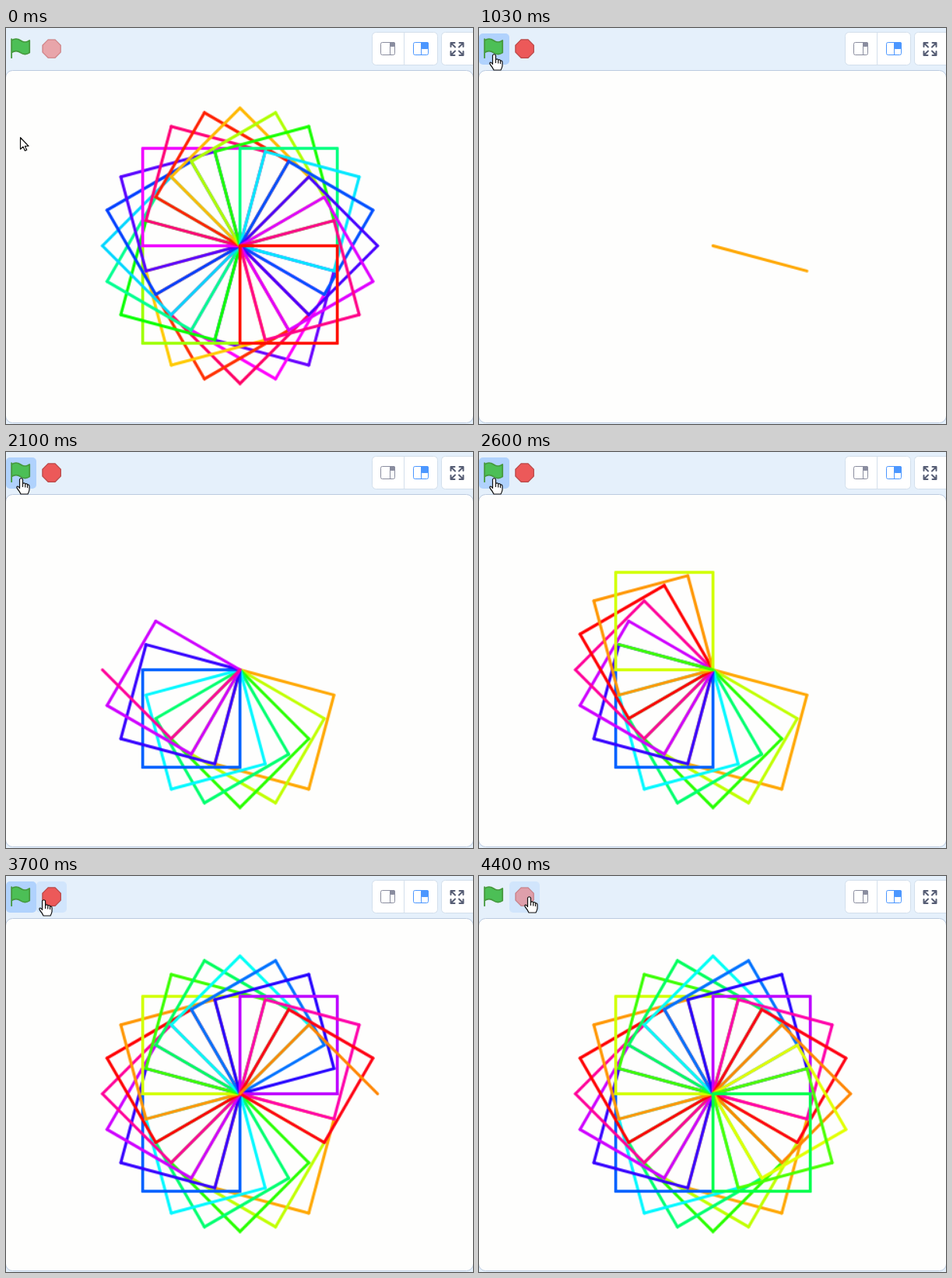
Recreate the animation shown at these times as an HTML page with a canvas. Size 600 px wide and 508 px high, loop 5630 ms.

```html
<!DOCTYPE html>
<html lang="en">
<head>
<meta charset="utf-8">
<title>Turning squares</title>
<style>
html, body { margin: 0; height: 100%; overflow: hidden; background: #e5f0fb; }
canvas { display: block; }
</style>
</head>
<body>
<canvas id="view" width="600" height="508"></canvas>
<script>
const LOOP = 5630, RUN = 1030, DONE = 4200, SIDES = 96;
const ctx = document.getElementById('view').getContext('2d');
const layer = document.createElement('canvas');
layer.width = 480;
layer.height = 360;
const pen = layer.getContext('2d');
pen.lineWidth = 3;
pen.lineCap = 'round';

const shapes = {
  flag: new Path2D('M.75 2A6.44 6.44 0 0 1 8.44 2A6.44 6.44 0 0 0 16.13 2V12.4A6.44 6.44 0 0 1 8.44 12.4A6.44 6.44 0 0 0 .75 12.4M.75 16.8V.8'),
  stop: new Path2D('M4.5 .5H9.5L13.5 4.5V9.5L9.5 13.5H4.5L.5 9.5V4.5Z'),
  arrow: new Path2D('M.5 .5V15.5L4 12.3 6.4 17.5 8.7 16.5 6.4 11.5H11Z'),
  hand: new Path2D('M-2 1.5Q0-1 2 1.5V7Q4 5.5 5.5 7.5Q7.5 6.5 8 8.5Q10.5 8 10.5 10.5V15Q10 18 8.5 20.5H-.5Q-2 17-5 13.5Q-6.5 10.5-4.5 10.5Q-3 11-2 13ZM2 7V11M5.2 8V11.5M8 9V12'),
  expand: new Path2D('M577 24.5L572 19.5M571.5 24V19H576.5M582 24.5L587 19.5M587.5 24V19H582.5M577 29.5L572 34.5M571.5 30V35H576.5M582 29.5L587 34.5M587.5 30V35H582.5')
};

// Cursor way points: time, x, y
const track = [[30, 18, 140], [430, 19.5, 33.5], [3420, 19.5, 33.5], [3700, 48.5, 30.5], [3960, 64.5, 26.5]];

function cursorAt(t) {
  const i = track.findIndex(p => p[0] > t);
  if (i === 0) return track[0].slice(1);
  if (i < 0) return track.at(-1).slice(1);
  const [a, b] = [track[i - 1], track[i]];
  let u = (t - a[0]) / (b[0] - a[0]);
  if (i === 1) u = u * u * (3 - 2 * u);
  return [1, 2].map(j => a[j] + (b[j] - a[j]) * u);
}

function box(x, y, w, h, r, fill, stroke) {
  ctx.beginPath();
  ctx.roundRect(x, y, w, h, r);
  if (fill) { ctx.fillStyle = fill; ctx.fill(); }
  if (stroke) { ctx.strokeStyle = stroke; ctx.lineWidth = 1; ctx.stroke(); }
}

function icon(path, x, y, scale, fill, stroke, width, alpha = 1) {
  ctx.save();
  ctx.translate(x, y);
  ctx.scale(scale, scale);
  ctx.globalAlpha = alpha;
  ctx.lineWidth = width;
  ctx.lineCap = ctx.lineJoin = 'round';
  ctx.strokeStyle = stroke;
  if (fill) { ctx.fillStyle = fill; ctx.fill(path); }
  ctx.stroke(path);
  ctx.restore();
}

function sidesAt(t) {
  if (t < RUN) return SIDES;
  if (t < 1100) return 1;
  return Math.min(SIDES, Math.floor((t - 958) / 33.45));
}

// Squares turn 15 degrees each; the hue runs on from one run to the next.
function drawSquares(count, firstSquare) {
  pen.clearRect(0, 0, 480, 360);
  let x = 240.5, y = 179.5;
  for (let i = 0; i < count; i++) {
    const square = Math.floor(i / 4);
    const angle = ((square + 1) * 15 + (i % 4) * 90) * Math.PI / 180;
    const hue = 39.2 + 35.6 * (square + firstSquare);
    pen.strokeStyle = `hsl(${(hue + 1080) % 360} 100% 50%)`;
    pen.beginPath();
    pen.moveTo(x, y);
    x += 100 * Math.cos(angle);
    y += 100 * Math.sin(angle);
    pen.lineTo(x, y);
    pen.stroke();
  }
  ctx.drawImage(layer, 0, 55, 600, 450);
}

function drawHeader(running, x, y) {
  const over = left => y < 47 && x >= left && x < left + 39;
  const hover = 'rgba(77,151,255,.13)', active = 'rgba(77,151,255,.35)';
  if (running || over(0)) box(0, 7, 39, 40, 5, running ? active : hover);
  if (over(39)) box(39, 7, 39, 40, 5, hover);
  icon(shapes.flag, 6, 13, 1.5, '#4cbf56', '#45993d', 1.2);
  icon(shapes.stop, 46, 14, 1.8, '#ec5959', '#b84848', .7, running ? 1 : .5);

  const edge = '#d3dfec', grey = '#8a8d9f', blue = '#4c97ff';
  box(470.5, 5.5, 84, 42, 5, '#fff', edge);
  box(511.5, 5.5, 0, 42, 0, null, edge);
  box(559.5, 5.5, 50, 42, 5, '#fff', edge);
  box(481.5, 18.5, 18, 16, 2, '#fff', grey);
  box(493.5, 18.5, 0, 16, 0, null, grey);
  box(493.5, 18.5, 6, 5, 1, grey, grey);
  box(523.5, 18.5, 19, 16, 2, '#fff', blue);
  box(533.5, 18.5, 0, 16, 0, null, blue);
  box(533.5, 18.5, 9, 8, 1, blue, blue);
  icon(shapes.expand, 0, 0, 1, null, '#575e75', 2);
}

function draw(t) {
  const [x, y] = cursorAt(t);
  ctx.fillStyle = '#e5f0fb';
  ctx.fillRect(0, 0, 600, 508);
  drawHeader(t >= RUN && t < DONE, x, y);
  box(-.5, 54.5, 601, 452, 9, '#fefefd', '#bccbe0');
  drawSquares(sidesAt(t), t < RUN ? -24 : 0);
  icon(y < 47 ? shapes.hand : shapes.arrow, x, y, 1, '#fff', '#111', 1.2);
}

function tick(now) {
  draw(now % LOOP);
  requestAnimationFrame(tick);
}
draw(0);
requestAnimationFrame(tick);
</script>
</body>
</html>
```
